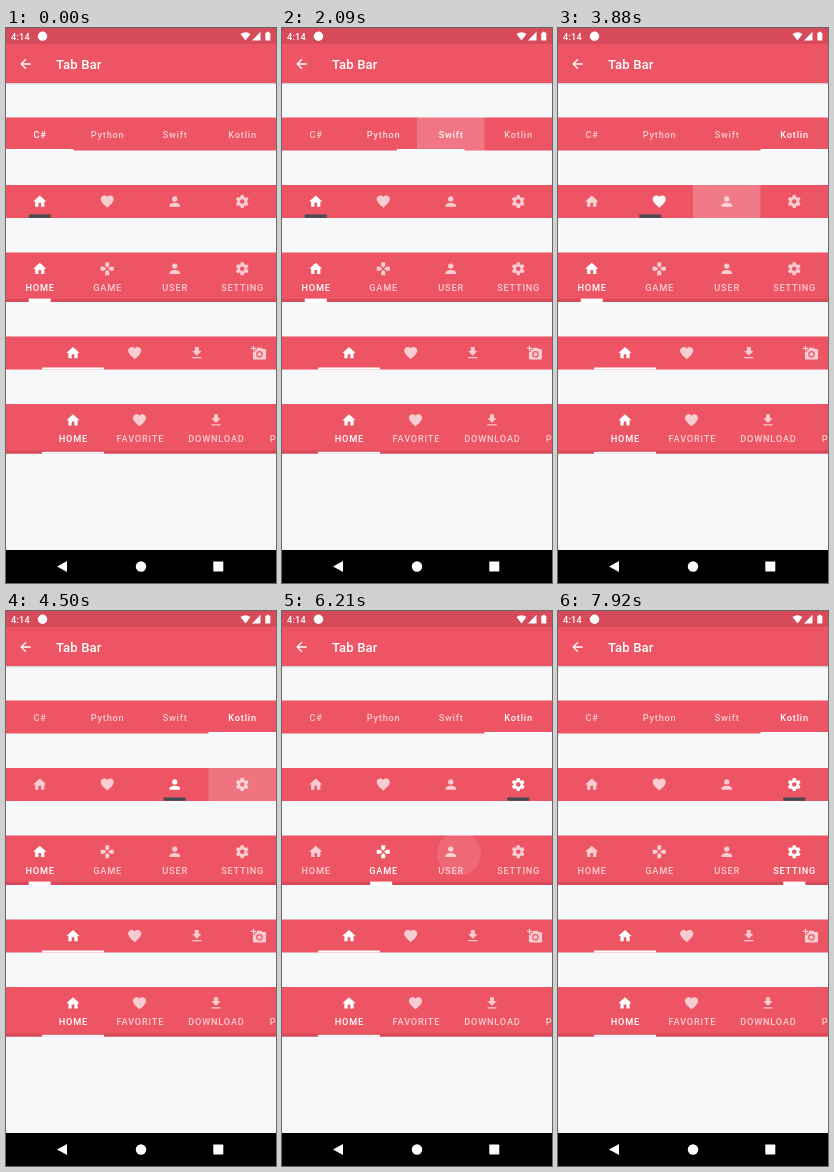
An HTML page for the animation above (8 s loop, 270 by 555 pixels).

```html
<!DOCTYPE html>
<html lang="en">
<head>
<meta charset="utf-8">
<title>Tab Bar</title>
<style>
html, body { margin: 0; height: 100%; overflow: hidden; background: #f7f8fa; }
svg { display: block; width: 100%; height: 100%; }
text { font: 500 9.2px Roboto, sans-serif; letter-spacing: .8px; }
</style>
</head>
<body>
<svg id="stage" viewBox="0 0 270 555" fill="#fff"></svg>
<script>
const LOOP = 8000, CELL = 67.5, RED = '#ed5565', DARK = '#d74a5a', DIM = .7;

// Six-toothed gear with a round hole, in a 24-unit box.
function gear() {
  const points = [];
  for (let k = 0; k < 6; k++)
    for (const [r, a] of [[7.4, -23], [10.1, -13], [10.1, 13], [7.4, 23]]) {
      const angle = (k * 60 + a - 90) * Math.PI / 180;
      points.push(`${(12 + r * Math.cos(angle)).toFixed(2)} ${(12 + r * Math.sin(angle)).toFixed(2)}`);
    }
  return `M${points.join('L')}zM8.5 12a3.5 3.5 0 1 0 7 0a3.5 3.5 0 1 0-7 0z`;
}

const icons = {
  back: 'M20 11H7.8l5.6-5.6L12 4l-8 8 8 8 1.4-1.4L7.8 13H20z',
  home: 'M10 20v-6h4v6h5v-8h3L12 3 2 12h3v8z',
  heart: 'M12 21.35l-1.45-1.32C5.4 15.36 2 12.28 2 8.5 2 5.42 4.42 3 7.5 3c1.74 0 3.41.81 4.5 2.09C13.09 3.81 14.76 3 16.5 3 19.58 3 22 5.42 22 8.5c0 3.78-3.4 6.86-8.55 11.54z',
  user: 'M8 8a4 4 0 1 0 8 0a4 4 0 1 0-8 0zM12 14c-2.67 0-8 1.34-8 4v2h16v-2c0-2.66-5.33-4-8-4z',
  gear: gear(),
  game: 'M15 7.5V2H9v5.5l3 3zM7.5 9H2v6h5.5l3-3zM9 16.5V22h6v-5.5l-3-3zM16.5 9l-3 3 3 3H22V9z',
  download: 'M19 9h-4V3H9v6H5l7 7zM5 18v2h14v-2z',
  photo: 'M3 4V1h2v3h3v2H5v3H3V6H0V4zM6 10V7h3V4h7l1.8 2H21a2 2 0 0 1 2 2v12a2 2 0 0 1-2 2H5a2 2 0 0 1-2-2V10zM8 14a5 5 0 1 0 10 0a5 5 0 1 0-10 0zM9.8 14a3.2 3.2 0 1 0 6.4 0a3.2 3.2 0 1 0-6.4 0z'
};

const rect = (x, y, w, h, fill, extra = '') =>
  `<rect x="${x}" y="${y}" width="${w}" height="${h}" fill="${fill}" ${extra}/>`;
const icon = (name, x, y) =>
  `<path d="${icons[name]}" fill-rule="evenodd" transform="translate(${x - 7.87} ${y - 7.87}) scale(.656)"/>`;
const label = (s, x, y) => `<text x="${x + .4}" y="${y}" text-anchor="middle">${s}</text>`;
const tab = (body, on) => `<g class="tab" opacity="${on ? 1 : DIM}">${body}</g>`;

// Each tap: [press time, time the indicator leaves, pressed x]; a tap selects the next tab.
const rows = [
  { y: 89.5, h: 33, time: 300, mark: [0, 121, CELL, 2, '#fff'],
    taps: [[1340, 1410, 101], [1920, 1990, 169], [2460, 2490, 236]],
    tabs: ['C#', 'Python', 'Swift', 'Kotlin'].map((s, i) => label(s, CELL * (i + .5), 109.5)) },
  { y: 157, h: 33, time: 640, mark: [22.75, 186.5, 22, 3.3, '#434a54'],
    taps: [[3090, 3566, 101], [3680, 3920, 169], [4240, 4520, 236]],
    tabs: ['home', 'heart', 'user', 'gear'].map((s, i) => icon(s, CELL * (i + .5), 173.5)) },
  { y: 224.5, h: 49.5, time: 640, line: 3, mark: [22.75, 270.6, 22, 3.4, '#fff'],
    taps: [[5380, 5770, 101.5], [6210, 6540, 177], [7130, 7280, 236]],
    tabs: [['home', 'HOME'], ['game', 'GAME'], ['user', 'USER'], ['gear', 'SETTING']]
      .map(([s, t], i) => icon(s, CELL * (i + .5), 240.7) + label(t, CELL * (i + .5), 262.8)) },
  { y: 308.5, h: 33, mark: [36, 339.5, 62, 2, '#fff'], taps: [],
    tabs: [icon('home', 67, 325), icon('heart', 128.7, 325), icon('download', 190.8, 325), icon('photo', 252.8, 325)] },
  { y: 376, h: 49.5, line: 3, mark: [36, 423.8, 62, 2, '#fff'], taps: [],
    tabs: [icon('home', 67, 392.2) + label('HOME', 67, 414.3),
      icon('heart', 133.5, 392.2) + label('FAVORITE', 134, 414.3),
      icon('download', 210, 392.2) + label('DOWNLOAD', 210, 414.3),
      label('PHOTO', 280.5, 414.3)] }
];

const drawRow = (row, i) => `<g id="row${i}">` +
  rect(0, row.y, 270, row.h, RED) +
  (row.line ? rect(0, row.y + row.h - row.line, 270, row.line, DARK) : '') +
  row.taps.map((tap, k) => {
    const id = `cell${i}${k}`;
    return `<clipPath id="${id}">${rect(CELL * (k + 1), row.y, CELL, row.h, '#fff')}</clipPath>` +
      `<g clip-path="url(#${id})"><circle class="ripple" cx="${tap[2]}" cy="${i == 2 ? 242.5 : row.y + row.h / 2}" r="0"/></g>`;
  }).join('') +
  row.tabs.map((body, k) => tab(body, k == 0)).join('') +
  rect(...row.mark, 'class="mark"') + '</g>';

stage.innerHTML =
  rect(0, 0, 270, 555, '#f7f8fa') +
  rect(0, 55, 270, 1, '#000', 'opacity=".14"') + rect(0, 56, 270, 1, '#000', 'opacity=".05"') +
  rect(0, 0, 270, 55, RED) + rect(0, 0, 270, 16, DARK) +
  '<text x="5" y="11.7" style="letter-spacing:.2px">4:14</text><circle cx="36.5" cy="8.3" r="4.7"/>' +
  '<path d="M234.5 6Q239.5 2.4 244.5 6L239.5 12.4zM254.5 3.8V12.4H246zM259.3 4.8h1.4v-1h2.2v1h1.4v7.6h-5z"/>' +
  icon('back', 19.5, 36) +
  '<text x="50" y="41" style="font-size:13.1px;letter-spacing:.15px">Tab Bar</text>' +
  rows.map(drawRow).join('') +
  rect(0, 522, 270, 33, '#000') +
  '<path d="M61 533v11l-10-5.5z"/><circle cx="135" cy="538.5" r="5.2"/>' +
  rect(207.3, 533.5, 10, 10, '#fff', 'rx=".8"');

const clamp = v => Math.min(1, Math.max(0, v));
const easeOut = p => 1 - (1 - clamp(p)) ** 3;

// Tab index of the indicator; a new tap takes over from wherever it is.
function position(row, t) {
  let pos = 0;
  row.taps.forEach(([, start], k) => {
    if (t < start) return;
    const next = row.taps[k + 1];
    const until = next ? Math.min(t, next[1]) : t;
    pos += (k + 1 - pos) * easeOut((until - start) / row.time);
  });
  return pos;
}

const moving = rows.slice(0, 3).map((row, i) => {
  const all = name => [...document.querySelectorAll(`#row${i} .${name}`)];
  return { row, tabs: all('tab'), ripples: all('ripple'), mark: all('mark')[0] };
});

function draw(t) {
  for (const { row, tabs, ripples, mark } of moving) {
    const pos = position(row, t);
    mark.setAttribute('x', row.mark[0] + pos * CELL);
    tabs.forEach((el, k) => el.setAttribute('opacity', DIM + (1 - DIM) * clamp(1 - Math.abs(pos - k))));
    ripples.forEach((el, k) => {
      const age = t - row.taps[k][0];
      const grow = clamp((age - 80) / 120), fade = clamp((460 - age) / 250);
      el.setAttribute('r', 22 + 38 * grow);
      el.setAttribute('opacity', age < 0 ? 0 : (.11 + .11 * grow) * fade);
    });
  }
}

let begin;
function frame(now) {
  begin ??= now;
  draw((now - begin) % LOOP);
  requestAnimationFrame(frame);
}
draw(0);
requestAnimationFrame(frame);
</script>
</body>
</html>
```
